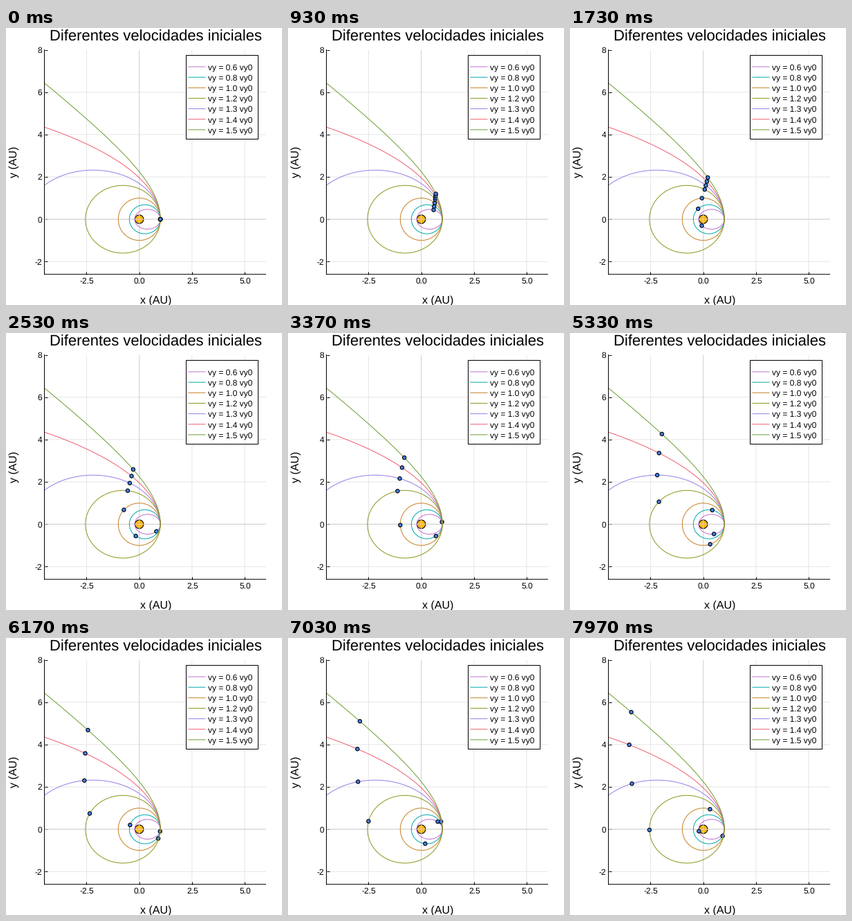
These frames come from a looping animation (399x400 px, 8 s). A matplotlib script:

```python
import numpy as np
import matplotlib.pyplot as plt
from matplotlib.animation import FuncAnimation
from matplotlib.patches import Circle, Rectangle

W, H, DPI = 399, 400, 128
FRAMES, LOOP_MS = 400, 8000
PER_YEAR = 200      # motion steps in one circular orbit
SUB = 20            # integration steps per motion step
YEARS = 2.5
BOX = (55.5, 31.5, 375.5, 355.7)   # plot area: left, top, right, bottom
UNIT = 30.5         # pixels per AU

FACTORS = [0.6, 0.8, 1.0, 1.2, 1.3, 1.4, 1.5]
COLORS = ["#c371d2", "#00aaae", "#c68225", "#8e971e",
          "#9b7fe9", "#f06073", "#6c9f33"]

plt.rcParams["font.family"] = "Liberation Sans"
plt.rcParams["text.hinting"] = "none"
plt.rcParams["text.hinting_factor"] = 1


def pt(px):
    return px * 72 / DPI


def orbits():
    """Leapfrog paths around a unit mass, shape (steps, 2, orbits)."""
    dt = 2 * np.pi / PER_YEAR / SUB
    k = np.array(FACTORS)
    pos = np.array([np.ones_like(k), np.zeros_like(k)])
    vel = np.array([np.zeros_like(k), 0.999 * k])

    def pull(p):
        return -p / np.hypot(p[0], p[1]) ** 3

    path = [pos]
    acc = pull(pos)
    for _ in range(int(YEARS * PER_YEAR * SUB)):
        half = vel + acc * dt / 2
        pos = pos + half * dt
        acc = pull(pos)
        vel = half + acc * dt / 2
        path.append(pos)
    return np.array(path)


def one_turn(k):
    """Integration steps until an orbit closes, or all of them."""
    axis = 2 - k * k
    years = min(axis ** -1.5, YEARS) if axis > 0 else YEARS
    return int(years * PER_YEAR * SUB)


path = orbits()

fig = plt.figure(figsize=(W / DPI, H / DPI), dpi=DPI, facecolor="white")

# Plot area
x0, y0, x1, y1 = BOX
ax = fig.add_axes([x0 / W, 1 - y1 / H, (x1 - x0) / W, (y1 - y0) / H])
ax.set(xlim=(-4.5, 6), ylim=(-2.6, 8))
xticks, yticks = [-2.5, 0, 2.5, 5], [-2, 0, 2, 4, 6, 8]
ax.set_xticks(xticks, [])
ax.set_yticks(yticks, [])
ax.tick_params(direction="in", length=pt(4), width=pt(1))
ax.grid(color="#e6e6e6", lw=pt(1), snap=False)
ax.set_axisbelow(True)
ax.spines[["top", "right"]].set_visible(False)
for side in ("left", "bottom"):
    ax.spines[side].set(linewidth=pt(1), snap=False)


def disc(radius, color):
    return ax.add_patch(Circle((0, 0), radius / UNIT, fc=color, ec="black",
                               lw=pt(1.1), zorder=2))


# Sun with the zero lines across it
disc(6.2, "#fdb813")
ax.axvline(0, color="lightgray", lw=pt(1), snap=False)
ax.axhline(0, color="lightgray", lw=pt(1), snap=False)

planets = []
for i, (k, color) in enumerate(zip(FACTORS, COLORS)):
    x, y = path[:one_turn(k) + 10:10, :, i].T
    ax.plot(x, y, color=color, lw=pt(1))
    planets.append(disc(2.65, "#4080f0"))

# Text and legend, laid out in pixels
page = fig.add_axes([0, 0, 1, 1])
page.set(xlim=(0, W), ylim=(H, 0))
page.axis("off")


def label(x, y, text, size, ha="center", angle=0):
    page.text(x, y, text, fontsize=pt(size), ha=ha, va="baseline",
              rotation=angle, rotation_mode="anchor")


label(216, 19, "Diferentes velocidades iniciales", 21.65)
label(216.3, 398, "x (AU)", 15.9)
label(16, 193.5, "y (AU)", 15.9, angle=90)
for v in xticks:
    label(x0 + 0.7 + (v + 4.5) / 10.5 * (x1 - x0), 369.3, f"{v:.1f}", 11.7)
for v in yticks:
    label(52.3, y1 - (v + 2.6) / 10.6 * (y1 - y0) + 4.3, f"{v}", 11.7,
          ha="right")

page.add_patch(Rectangle((260.5, 39.5), 104, 121, fc="white", ec="black",
                         lw=pt(1), snap=False))
for i, (k, color) in enumerate(zip(FACTORS, COLORS)):
    y = 56 + 15.15 * i
    page.plot([264, 288], [y, y], color=color, lw=pt(1), snap=False)
    label(292, y + 4.3, f"vy = {k} vy0", 11.7, ha="left")


def draw(frame):
    step = (3 * frame + 2) // 5   # 30 motion steps a second
    for i, planet in enumerate(planets):
        planet.center = path[step * SUB, :, i]
    return planets


anim = FuncAnimation(fig, draw, frames=FRAMES, interval=LOOP_MS / FRAMES,
                     repeat=True, repeat_delay=0)
plt.show()
```
